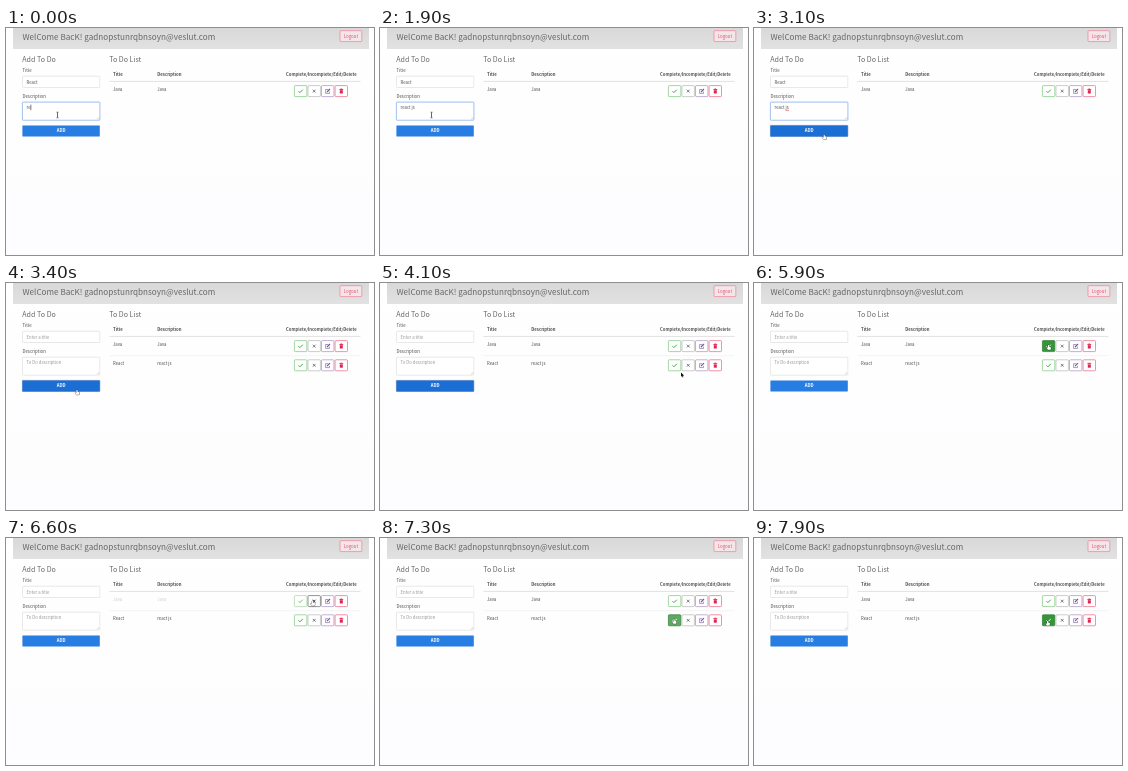
Animation of 368x227 px, one loop 8000 ms. Source, as an HTML page with a canvas:

```html
<!DOCTYPE html>
<html lang="en">
<head>
<meta charset="utf-8">
<title>To Do List</title>
<style>
html, body { margin: 0; width: 100%; height: 100%; overflow: hidden; background: #fff; }
canvas { display: block; width: 368px; height: 227px; }
</style>
</head>
<body>
<canvas id="stage"></canvas>
<script>
const W = 368, H = 227, LOOP = 8000, STEP = 100;
const canvas = document.getElementById('stage');
const ctx = canvas.getContext('2d');
const dpr = window.devicePixelRatio || 1;
canvas.width = W * dpr;
canvas.height = H * dpr;

const FONT = '"Noto Sans CJK JP", "Noto Sans", sans-serif';
const INK = '#4c4c4c', HEAD = '#686868', HINT = '#949494', GREEN = [54, 148, 58], RED = '#e0244f';
const ROWS = [
  { title: 'Java', note: 'Java', y: 57.6, done: [6300, 6800] },
  { title: 'React', note: 'react js', y: 76.8, from: 3400, done: [4700, 5400] }
];
const BTN = { w: 12.4, h: 11, x: [288.4, 302, 315.5, 329.1] };
const ADD = { x: 16.4, y: 97.4, w: 77.4, h: 11 };
const TITLE = { x: 16.5, y: 48.2, w: 77.3, h: 11.3 };
const NOTE = { x: 16.5, y: 74.2, w: 77.3, h: 18 };

// time, x, y of the pointer tip
const PATH = [
  [0, 51.5, 87], [2600, 51.5, 87], [3000, 70, 106.6], [3400, 71, 107],
  [4000, 301, 89.5], [4300, 301, 89.5], [4500, 294, 82], [4750, 294, 82],
  [5000, 301.5, 91], [5250, 308, 83], [5450, 308, 83], [5800, 294.5, 62],
  [6400, 294.5, 63], [6650, 308, 63], [6900, 308, 63], [7250, 294, 81],
  [8000, 293.5, 83]
];
const TYPED = [[0, 're'], [100, 'rea'], [300, 'react'], [500, 'react '], [1300, 'react j'], [1400, 'react js']];

const within = (t, [a, b]) => t >= a && t < b;
const inside = (p, r) => p.x >= r.x && p.x <= r.x + r.w && p.y >= r.y && p.y <= r.y + r.h;

function pointer(t) {
  let i = 1;
  while (i < PATH.length - 1 && t > PATH[i][0]) i++;
  const [t0, x0, y0] = PATH[i - 1], [t1, x1, y1] = PATH[i];
  const k = Math.max(0, Math.min(1, (t - t0) / (t1 - t0)));
  const e = k * k * (3 - 2 * k);
  return { x: x0 + (x1 - x0) * e, y: y0 + (y1 - y0) * e };
}

// share of the last moments spent over a box, used as a hover fade
function hover(t, r) {
  let n = 0;
  for (let i = 0; i < 10; i++) if (inside(pointer(t - i * 22), r)) n++;
  return n / 10;
}

const mix = (a, b, k) => `rgb(${a.map((v, i) => Math.round(v + (b[i] - v) * k)).join(',')})`;

// laid out large and scaled down, so small letters keep exact spacing
function text(s, x, y, size, color = INK, weight = 400, align = 'left') {
  ctx.save();
  ctx.translate(x, y);
  ctx.scale(0.1, 0.1);
  ctx.font = `${weight} ${size * 10}px ${FONT}`;
  ctx.textAlign = align;
  ctx.fillStyle = color;
  ctx.fillText(s, 0, 0);
  const w = ctx.measureText(s).width / 10;
  ctx.restore();
  return w;
}

function box(r, fill, stroke, width = 0.6, radius = 0.8) {
  ctx.beginPath();
  ctx.roundRect(r.x, r.y, r.w, r.h, radius);
  if (fill) { ctx.fillStyle = fill; ctx.fill(); }
  if (stroke) { ctx.strokeStyle = stroke; ctx.lineWidth = width; ctx.stroke(); }
}

function line(points, color, width) {
  ctx.beginPath();
  for (let i = 0; i < points.length; i += 2) ctx.lineTo(points[i], points[i + 1]);
  ctx.strokeStyle = color;
  ctx.lineWidth = width;
  ctx.stroke();
}

const ICONS = [
  c => line([-2.1, 0.1, -0.7, 1.5, 2.2, -1.4], c, 1),
  c => { line([-1.4, -1.4, 1.4, 1.4], c, 0.9); line([1.4, -1.4, -1.4, 1.4], c, 0.9); },
  c => {
    line([0.6, -1.6, -2.1, -1.6, -2.1, 2.3, 1.8, 2.3, 1.8, 0.5], c, 0.6);
    line([-0.7, 0.9, 2.3, -2.1], c, 1.1);
  },
  c => {
    ctx.fillStyle = c;
    ctx.fillRect(-1.9, -2.1, 3.8, 0.9);
    ctx.fillRect(-0.8, -2.6, 1.6, 0.6);
    ctx.fillRect(-1.5, -0.9, 3, 3.3);
  }
];

function header() {
  const g = ctx.createLinearGradient(0, 0, 0, 21);
  g.addColorStop(0, '#d8d8d8');
  g.addColorStop(1, '#e2e2e2');
  ctx.fillStyle = g;
  ctx.fillRect(7, 0, 356, 21);
  text('WelCome BacK! gadnopstunrqbnsoyn@veslut.com', 16.4, 11.8, 8.15, '#666');
  box({ x: 334, y: 2.7, w: 21.8, h: 10.9 }, '#f3e6e9', '#f3708e');
  text('Logout', 344.9, 9.8, 4.4, '#e84a6e', 400, 'center');
}

function field(r, focus) {
  if (focus) box(r, null, 'rgba(50,115,220,.13)', 1.8);
  box(r, '#fff', focus ? '#7fa9e6' : '#dadada');
}

function form(t) {
  text('Add To Do', 16.3, 34.3, 7.1, HEAD);
  text('Title', 16.4, 43.7, 4.4);
  text('Description', 16.4, 69.8, 4.4);
  const sent = t >= 3400, addFocus = within(t, [3000, 4700]);
  field(TITLE, false);
  field(NOTE, t < 3200);
  line([91, 91.2, 93, 89.2], '#aaa', 0.4);
  line([92, 91.4, 93.2, 90.2], '#aaa', 0.4);
  if (sent) {
    text('Enter a title', 20.6, 55.5, 4.25, HINT);
    text('To Do description', 20.6, 81.1, 4.25, HINT);
  } else {
    text('React', 20.6, 55.5, 4.25);
    const [since, typed] = TYPED.filter(k => k[0] <= t).pop();
    const w = text(typed, 20.6, 81.1, 4.25);
    if (t < 3000 && Math.floor((t - since) / 500) % 2 === 0)
      line([20.9 + w, 76.6, 20.9 + w, 82.2], '#222', 0.6);
    if (t >= 3000) line([31.6, 82.3, 35, 82.3], '#e05050', 0.7);
  }
  const dark = Math.max(hover(t, ADD), addFocus ? 1 : 0);
  box(ADD, mix([39, 125, 225], [27, 110, 212], dark), addFocus ? '#2a62b4' : null, 0.5, 0.3);
  text('ADD', 55.1, 104.4, 4.3, '#fff', 700, 'center');
}

function row(r, t) {
  const done = within(t, r.done);
  const ink = done ? '#cfcfcf' : INK;
  text(r.title, 107, r.y + 5, 4.3, ink);
  text(r.note, 151.2, r.y + 5, 4.3, ink);
  const tones = ['#3fa443', '#333', '#75529a', RED];
  const edges = ['#7cc67f', done ? '#666' : '#999', '#ab90c2', '#ef6485'];
  BTN.x.forEach((x, i) => {
    const b = { x, y: r.y, w: BTN.w, h: BTN.h };
    const off = (i === 0 && done) || (i === 1 && !done);
    const h = i === 0 && !done ? hover(t, b) : 0;
    ctx.globalAlpha = off ? 0.7 : 1;
    box(b, h ? mix([255, 255, 255], GREEN, h) : '#fff', h > 0.5 ? '#2f7f33' : edges[i], 0.7);
    ctx.save();
    ctx.translate(x + b.w / 2, r.y + b.h / 2);
    ICONS[i](h > 0.4 ? '#fff' : tones[i]);
    ctx.restore();
    ctx.globalAlpha = 1;
  });
}

function list(t) {
  text('To Do List', 103.2, 34.3, 7.1, HEAD);
  text('Title', 107, 47.6, 4.3, INK, 700);
  text('Description', 151.2, 47.6, 4.3, INK, 700);
  text('Complete/Incomplete/Edit/Delete', 280, 47.6, 4.25, INK, 700);
  line([103.3, 53.4, 354.5, 53.4], '#d6d6d6', 0.7);
  const rows = ROWS.filter(r => !r.from || t >= r.from);
  if (rows.length > 1) line([103.3, 72.7, 354.5, 72.7], '#e8e8e8', 0.5);
  rows.forEach(r => row(r, t));
}

function cursor(t) {
  const p = pointer(t);
  const buttons = ROWS.flatMap(r => BTN.x.map(x => ({ x, y: r.y, w: BTN.w, h: BTN.h })));
  ctx.save();
  ctx.translate(p.x, p.y);
  if (inside(p, NOTE) || inside(p, TITLE)) {
    line([0, -2.6, 0, 2.6], '#222', 0.7);
    line([-1.1, -2.8, 1.1, -2.8], '#222', 0.5);
    line([-1.1, 2.8, 1.1, 2.8], '#222', 0.5);
  } else {
    const hand = inside(p, ADD) || buttons.some(b => inside(p, b));
    const shape = hand
      ? [-0.5, 0, 0.5, 0, 0.6, 1.7, 2.4, 2.2, 2.2, 4.6, -0.5, 4.8, -2, 2.8, -1.4, 2.3, -0.5, 3]
      : [0, 0, 0, 4.3, 1, 3.4, 1.8, 5, 2.5, 4.7, 1.8, 3.2, 3.1, 3.1];
    ctx.beginPath();
    for (let i = 0; i < shape.length; i += 2) ctx.lineTo(shape[i], shape[i + 1]);
    ctx.closePath();
    ctx.lineJoin = 'round';
    ctx.strokeStyle = hand ? '#333' : '#fff';
    ctx.lineWidth = 0.7;
    ctx.stroke();
    ctx.fillStyle = hand ? '#fff' : '#111';
    ctx.fill();
  }
  ctx.restore();
}

function draw(t) {
  ctx.setTransform(dpr, 0, 0, dpr, 0, 0);
  const g = ctx.createLinearGradient(0, 0, 0, H);
  g.addColorStop(0, '#fff');
  g.addColorStop(1, '#fdfcfe');
  ctx.fillStyle = g;
  ctx.fillRect(0, 0, W, H);
  header();
  form(t);
  list(t);
  cursor(t);
}

const start = performance.now();
function tick() {
  const t = (performance.now() - start) % LOOP;
  draw(Math.floor(t / STEP) * STEP);
  requestAnimationFrame(tick);
}
tick();
</script>
</body>
</html>
```
